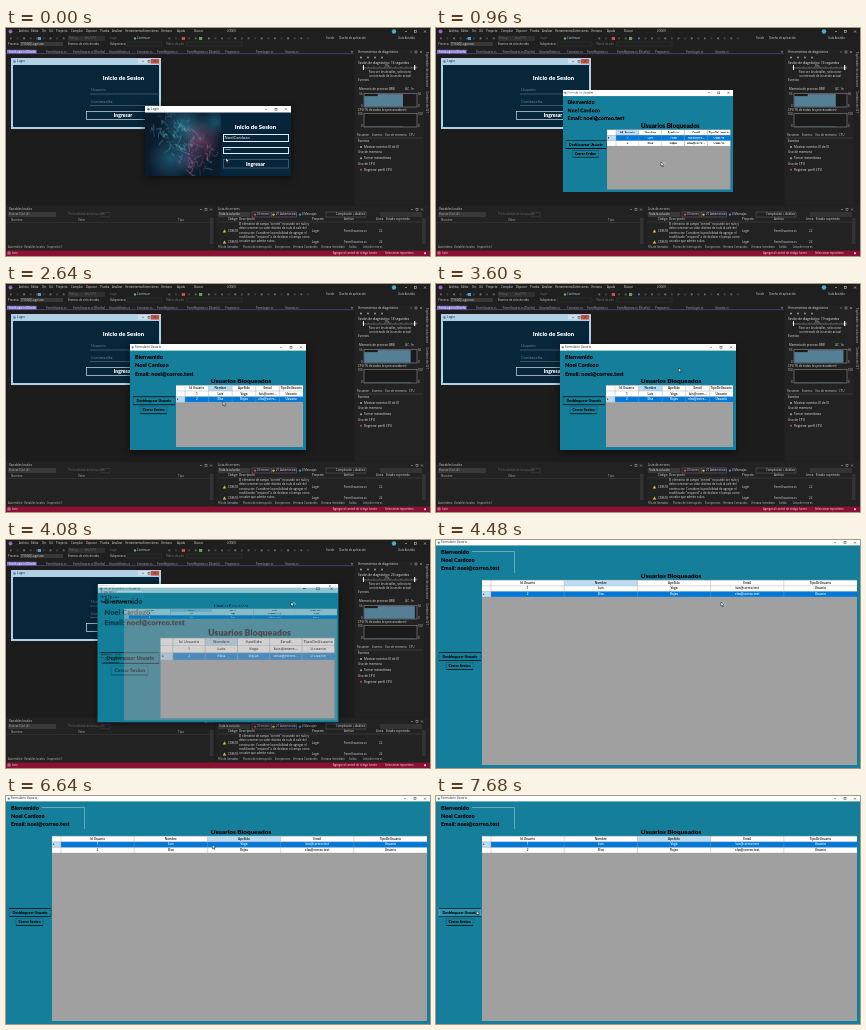
An HTML page with a canvas for the animation above (8000 ms loop, 424 by 228 pixels).

```html
<!DOCTYPE html>
<html lang="es">
<head>
<meta charset="utf-8">
<title>Usuarios bloqueados</title>
<style>
  html, body { margin: 0; width: 100%; height: 100%; overflow: hidden; background: #1f1f1f; }
  canvas { display: block; width: 424px; height: 228px; }
</style>
</head>
<body>
<canvas id="stage" width="424" height="228"></canvas>
<script>
const W = 424, H = 228, LOOP = 8000;
const stage = document.getElementById('stage').getContext('2d');
let g = stage;

const clamp = v => Math.max(0, Math.min(1, v));
const easeOut = u => 1 - (1 - clamp(u)) ** 2;
const smooth = u => u * u * (3 - 2 * u);

// ---- drawing helpers ----
function box(x, y, w, h, color) {
  g.fillStyle = color;
  g.fillRect(x, y, w, h);
}
function shadowBox(x, y, w, h, color) {
  g.save();
  g.shadowColor = 'rgba(0,0,0,.6)';
  g.shadowBlur = 7;
  g.shadowOffsetY = 2;
  box(x, y, w, h, color);
  g.restore();
}
function frame(x, y, w, h, color, width = 0.7) {
  g.strokeStyle = color;
  g.lineWidth = width;
  g.strokeRect(x, y, w, h);
}
function line(color, width, ...points) {
  g.strokeStyle = color;
  g.lineWidth = width;
  g.beginPath();
  points.forEach(([x, y]) => g.lineTo(x, y));
  g.stroke();
}
function dot(x, y, r, color) {
  g.fillStyle = color;
  g.beginPath();
  g.arc(x, y, r, 0, 7);
  g.fill();
}
function text(s, x, y, size, color, align = 'left', font = '"Open Sans", sans-serif', weight = 400) {
  g.font = `${weight} ${size}px ${font}`;
  g.textAlign = align;
  g.textBaseline = 'middle';
  g.fillStyle = color;
  g.fillText(s, x, y);
}
const heavy = (s, x, y, size, color, align) => text(s, x, y, size, color, align, 'Lato, sans-serif', 900);
// Labels written as "x words|x words|..."
function labels(y, spec, color = '#c4c4c4', size = 3) {
  for (const item of spec.split('|')) {
    const [, x, s] = item.match(/^(\d+) (.*)$/);
    text(s, +x, y, size, color);
  }
}
function windowButtons(right, y, color, gap = 10) {
  line(color, 0.5, [right - 2 * gap - 1, y], [right - 2 * gap + 1, y]);
  frame(right - gap - 1, y - 1, 2, 2, color, 0.5);
  line(color, 0.5, [right - 1, y - 1], [right + 1, y + 1]);
  line(color, 0.5, [right - 1, y + 1], [right + 1, y - 1]);
}
function layer(w, h, draw) {
  const canvas = document.createElement('canvas');
  canvas.width = w;
  canvas.height = h;
  g = canvas.getContext('2d');
  draw();
  g = stage;
  return canvas;
}

// ---- development environment ----
function designedForm() {
  box(5, 30, 150, 71, '#b1d0e6');
  text('Login', 11, 33.5, 3.2, '#222');
  dot(8.5, 33.5, 1.2, '#4c7fa6');
  box(132, 31, 12, 4.5, '#cadfeb');
  box(145, 31, 8, 4.5, '#c9503f');
  windowButtons(149, 33.3, '#333', 6);
  box(7, 37, 146, 62, '#07263a');
  heavy('Inicio de Sesion', 117.5, 50, 5.9, '#fff', 'center');
  text('Usuario', 85, 62, 4, '#7b8a94');
  line('#53687a', 0.7, [84, 66], [152, 66]);
  text('Contraseña', 85, 74, 4, '#7b8a94');
  line('#53687a', 0.7, [84, 77.5], [152, 77.5]);
  frame(80.5, 83.5, 72, 8, '#d5dde2', 0.7);
  heavy('Ingresar', 117, 87.5, 5, '#fff', 'center');
}

function diagnostics() {
  box(349, 21, 69, 156, '#222223');
  labels(24, '352 Herramientas de diagnóstico', '#ddd');
  windowButtons(415, 24, '#aaa', 5);
  for (let i = 0; i < 4; i++) dot(355 + i * 7, 29.5, 0.9, i ? '#8aa0b0' : '#aaa');
  line('#999', 0.5, [357, 40], [411, 40]);
  for (let x = 357; x <= 411; x += 5.4) line('#999', 0.4, [x, 38.5], [x, 40]);
  box(357, 37, 1, 5, '#fff');
  box(408, 37, 1.3, 5, '#fff');
  text('10s', 381, 38, 2.8, '#ddd', 'center');
  text('Para ver los detalles, seleccione', 384, 44.5, 2.9, '#ddd', 'center');
  text('un intervalo de la sesión actual', 384, 48, 2.9, '#ddd', 'center');
  labels(52, '352 Eventos', '#e0e0e0');
  labels(61.5, '353 Memoria de proceso (MB)|399 GC|405 In', '#e4e4e4');
  labels(82.5, '352 CPU (% de todos los procesadores)', '#e4e4e4');
  for (const y of [65.5, 85.5]) {
    box(358, y, 53, 13.5, '#1b1b1c');
    frame(358, y, 53, 13.5, '#8d8d8d', 0.6);
    const top = y < 70 ? '66' : '100';
    for (const [x, align] of [[356.5, 'right'], [412, 'left']]) {
      text(top, x, y + 1, 2.8, '#ccc', align);
      text('0', x, y + 13, 2.8, '#ccc', align);
    }
  }
  labels(107.5, '351 Resumen|366 Eventos|379 Uso de memoria|403 CPU', '#ccc', 2.8);
  line('#555', 0.5, [350, 110], [417, 110]);
  ['Eventos', 'Mostrar eventos (0 de 0)', 'Uso de memoria', 'Tomar instantánea', 'Uso de CPU', 'Registrar perfil CPU']
    .forEach((s, i) => {
      const y = 113.2 + i * 5.7, title = i % 2 === 0;
      if (!title) dot(355, y, 1, i === 5 ? '#c84b4b' : '#9ab');
      text(s, title ? 352 : 358, y, 3.1, '#e4e4e4');
    });
}

function bottomPanels() {
  box(0, 178, 208, 44, '#222223');
  box(210, 178, 214, 44, '#222223');
  labels(181.5, '3 Variables locales|212 Lista de errores', '#ccc');
  windowButtons(205, 181.5, '#aaa', 5);
  windowButtons(416, 181.5, '#aaa', 5);
  box(2, 184, 48, 5, '#383838');
  labels(186.6, '3 Buscar (Ctrl+E)', '#aaa');
  labels(186.6, '62 Profundidad de búsqueda:', '#666');
  frame(95, 184.3, 9, 4.5, '#444', 0.5);
  labels(192, '5 Nombre|72 Valor|172 Tipo', '#aaa');
  line('#3c3c3c', 0.5, [0, 194.5], [208, 194.5]);
  box(204, 190, 3.5, 26, '#333334');
  box(212, 184, 32, 5, '#383838');
  labels(186.6, '213 Toda la solución|251 0 Errores|270 27 Advertencias|296 0 Mensajes|330 Compilación + Análisis|377 Buscar en la lista', '#ddd', 2.8);
  dot(249, 186.6, 1.2, '#d04545');
  dot(267.5, 186.6, 1.2, '#d9b13c');
  dot(294, 186.6, 1.2, '#3c8ad9');
  frame(246, 184, 18, 5, '#77628f', 0.5);
  frame(265.5, 184, 25, 5, '#77628f', 0.5);
  frame(320, 184, 40, 5, '#666', 0.5);
  box(374, 184, 42, 5, '#333');
  labels(191.7, '222 Código|233 Descripción|306 Proyecto|338 Archivo|370 Línea|380 Estado suprimido', '#ddd', 2.9);
  line('#444', 0.5, [211, 194], [420, 194]);
  ['El elemento de campo "control" no puede ser nulo y', 'debe contener un valor distinto de nulo al salir del',
    'constructor. Considere la posibilidad de agregar el', 'modificador "required" o de declarar el campo como', 'un valor que admite nulos.']
    .forEach((s, i) => text(s, 233, 196.6 + i * 4.1, 2.9, '#ddd'));
  for (const y of [203, 214]) {
    g.fillStyle = '#e0b93c';
    g.beginPath();
    g.moveTo(218.5, y - 1.5); g.lineTo(220.3, y + 1.5); g.lineTo(216.7, y + 1.5);
    g.fill();
    labels(y, '222 CS8618|306 Login|338 FormUsuarios.cs|373 22', '#ddd', 2.9);
  }
  box(416, 190, 3.5, 26, '#333334');
  labels(219, '2 Automático|18 Variables locales|41 Inspección 1|212 Pila de llamadas|237 Puntos de interrupción|269 Excepciones|287 Ventana Comandos|315 Ventana Inmediato|343 Salida|357 Lista de errores', '#bbb', 2.7);
}

const ide = layer(W, H, () => {
  box(0, 0, W, H, '#1f1f1f');
  dot(4.5, 3.5, 2, '#9a63c7');
  labels(3.5, '13 Archivo|25 Editar|36 Ver|43 Git|50 Proyecto|65 Compilar|80 Depurar|94 Prueba|106 Analizar|119 Herramientas|137 Extensiones|155 Ventana|171 Ayuda|188 Buscar|221 LOGIN', '#dcdcdc', 2.8);
  dot(388, 3.5, 2.2, '#4fa9c8');
  windowButtons(419, 3.5, '#ddd', 9.5);
  for (let i = 0; i < 46; i++) {
    const x = 4 + i * 6.6;
    if (x < 58 || x > 160) box(x, 9.5, 1.8, 1.8, ['#686868', '#4c4c4c', '#587f9f', '#404040'][i * 7 % 4]);
  }
  box(32, 9, 3, 3, '#4c9bd6');
  box(62, 8, 37, 5, '#303030');
  labels(10.5, '63 Debug|79 Any CPU|104 Login', '#6c6c6c', 2.8);
  labels(10.5, '131 Continuar|320 Fondo|333 Diseño de aplicación|392 Guía Asistida', '#cfcfcf', 2.8);
  dot(129, 10.5, 1.2, '#5bb65b');
  box(176, 9, 3, 3, '#c9504a');
  box(193, 9, 3, 3, '#58a75d');
  box(14, 14, 43, 4, '#383838');
  labels(16, '2 Proceso:|15 [15604] Login.exe|62 Eventos de ciclo de vida|104 Subproceso:', '#d6d6d6', 2.8);
  labels(16, '160 Marco de pila:', '#777', 2.8);
  frame(121, 14, 35, 4, '#383838', 0.5);
  frame(181, 14, 55, 4, '#383838', 0.5);
  box(1, 21.8, 29, 3.8, '#8478d0');
  labels(23.8, '3 FormLogin.cs [Diseño]', '#fff', 2.7);
  labels(23.8, '40 FormUsuario.cs|67 FormUsuario.cs [Diseño]|103 UsuarioDatos.cs|131 Conexion.cs|151 FormRegistro.cs|181 FormRegistro.cs [Diseño]|219 Program.cs|250 FormLogin.cs|279 Usuario.cs', '#a8a8a8', 2.8);
  box(0, 25.5, 348, 0.8, '#5d55a0');
  dot(346, 23.8, 0.8, '#aaa');
  box(0, 26.3, 348, 151, '#1c1c1c');
  designedForm();
  diagnostics();
  g.save();
  g.translate(421, 24);
  g.rotate(Math.PI / 2);
  text('Explorador de soluciones     Cambios de GIT', 0, 0, 3, '#bbb');
  g.restore();
  bottomPanels();
  box(0, 222.5, W, 5.5, '#8c1035');
  frame(2, 224, 2, 2, '#ddd', 0.5);
  labels(225.4, '6 Listo|327 Agregar al control de código fuente|379 Seleccionar repositorio', '#f0dce2', 2.7);
  dot(419, 225.3, 1, '#eee');
});

function liveDiagnostics(t) {
  const edge = 397 + t * 0.0029;
  text(`Sesión de diagnóstico: ${16 + Math.floor(t / 1000)} segundos`, 352, 34.8, 3.1, '#f0f0f0');
  box(358.3, 68.5, 14, 10.2, '#557f94');
  box(372, 66.5, edge - 372, 12.2, '#557f94');
  line('#83a9ba', 0.4, [358.3, 68.5], [372, 68.5], [372, 66.5], [edge, 66.5]);
  line('#4f7f94', 0.4, [358.3, 98.6], [375, 98.3], [edge, 98.6]);
}

// ---- login dialog ----
const nebula = layer(76, 64, () => {
  let seed = 11;
  const random = () => (seed = seed * 16807 % 2147483647) / 2147483647;
  box(0, 0, 76, 64, '#0c1b2b');
  g.globalCompositeOperation = 'screen';
  for (const [x, y, r, color] of [[40, 14, 24, '36,112,138'], [26, 46, 24, '24,88,112'], [56, 28, 20, '122,44,72'], [44, 46, 16, '62,40,76'], [70, 10, 16, '20,84,108']]) {
    const glow = g.createRadialGradient(x, y, 0, x, y, r);
    glow.addColorStop(0, `rgba(${color},.7)`);
    glow.addColorStop(1, `rgba(${color},0)`);
    box(0, 0, 76, 64, glow);
  }
  // Filaments flow down to the right, pink on the right-hand side
  for (let i = 0; i < 110; i++) {
    const u = random(), across = random() - 0.5;
    const x = 14 + u * 48 + across * 20, y = 2 + u * 54 - across * 28;
    const pink = x > 42 && y > 12 && random() < 0.65;
    const bend = () => (random() - 0.4) * 13;
    g.strokeStyle = `hsla(${pink ? 342 : 192},55%,${30 + random() * 35}%,.4)`;
    g.lineWidth = 0.4 + random() * 0.7;
    g.beginPath();
    g.moveTo(x, y);
    g.quadraticCurveTo(x + bend(), y + bend(), x + bend(), y + bend());
    g.stroke();
  }
});

function login(t) {
  shadowBox(139, 78, 146, 70, '#07253a');
  box(139, 78, 146, 6.5, '#fff');
  dot(142.5, 81.3, 1.2, '#4c7fa6');
  text('Login', 145, 81.4, 3.2, '#222');
  windowButtons(280, 81.3, '#333');
  g.drawImage(nebula, 139, 84.5, 76, 63.5);
  heavy('Inicio de Sesion', 249.5, 99.5, 5.9, '#fff', 'center');
  frame(217.5, 106.5, 65, 7, '#fff', 0.9);
  text('NoelCardozo', 218.5, 110, 4.2, '#fff');
  frame(217.5, 119.5, 65, 6, '#fff', 0.9);
  text('••••••', 218.5, 122.5, 3, '#fff');
  if (t > 200) box(217, 131.5, 66, 8.5, t > 480 && t < 600 ? '#1b4a66' : '#12384f');
  frame(217.5, 131.5, 65, 8.5, '#6f8593', 0.5);
  heavy('Ingresar', 249.5, 136, 5.2, '#fff', 'center');
}

// ---- user window ----
const HEADERS = ['Id Usuario', 'Nombre', 'Apellido', 'Email', 'TipoDeUsuario'];
const USERS = [
  ['1', 'Luis', 'Vega', 'luis@correo.test', 'Usuario'],
  ['2', 'Elsa', 'Rojas', 'elsa@correo.test', 'Usuario'],
];

function userWindow(w, h, { row, col, hover }) {
  const maximized = w === W, caption = maximized ? 5.4 : 6.6;
  box(0, 0, w, h, '#157f9b');
  box(0, 0, w, caption, '#fff');
  dot(2.7, caption / 2, 1.1, '#4c7fa6');
  text('Formulario Usuario', 5, caption / 2, 2.9, '#222');
  windowButtons(w - 5, caption / 2, '#333');
  if (maximized) line('#9cc8d4', 0.6, [36, 11.5], [78.5, 11.5], [78.5, 33]);
  const y0 = caption - 5.4;
  heavy('Bienvenido', 5, y0 + 12.2, 5.5, '#000');
  heavy('Noel Cardozo', 5, y0 + 20.5, 5.5, '#000');
  heavy('Email: noel@correo.test', 5, y0 + 28.7, 5.5, '#000');
  heavy('Usuarios Bloqueados', w / 2 + 23, y0 + 36.2, 6.4, '#000', 'center');

  const mid = h / 2 + 2.5 + y0;
  if (hover) box(3, mid - 4, 42, 8, '#2b93ae');
  frame(3, mid - 4, 42, 8, hover ? '#7fc0d2' : '#0d586d', 0.5);
  for (const y of [mid - 4, mid + 4]) line('#000', 0.7, [3, y], [45, y]);
  heavy('Desbloquear Usuario', 24, mid, 3.7, '#000', 'center');
  frame(10, mid + 6, 27, 7, '#0d586d', 0.5);
  line('#000', 0.7, [10, mid + 13], [37, mid + 13]);
  heavy('Cerrar Sesion', 23.5, mid + 9.5, 3.7, '#000', 'center');

  const left = 46, top = y0 + 40.2, rowH = 5.6, first = 55, colW = (w - 3 - first) / 5;
  box(left, top, w - 3 - left, h - 3 - top, '#a0a0a0');
  box(left, top, w - 3 - left, rowH * 3, '#fff');
  box(first + col * colW, top, colW, rowH, '#bcdcf4');
  box(left, top + rowH * (row + 1), first - left, rowH, '#bcdcf4');
  box(first, top + rowH * (row + 1), w - 3 - first, rowH, '#0078d7');
  text('▸', left + 1, top + rowH * (row + 1.5), 3, '#222', 'left', '"DejaVu Sans", sans-serif');
  [HEADERS, ...USERS].forEach((cells, r) => cells.forEach((cell, c) => {
    const s = colW < 30 && cell.length > 13 ? cell.slice(0, 10) + '...' : cell;
    text(s, first + (c + 0.5) * colW, top + rowH * (r + 0.5), 3, r === row + 1 ? '#fff' : '#111', 'center', '"Open Sans", sans-serif', 600);
  }));
  for (let i = 0; i < 4; i++) line('#a0a0a0', 0.4, [left, top + i * rowH], [w - 3, top + i * rowH]);
  for (let i = 0; i < 5; i++) line('#a0a0a0', 0.4, [first + i * colW, top], [first + i * colW, top + 3 * rowH]);
}

function userWindowIn(x, y, w, h, baseW, baseH, state, alpha) {
  g.save();
  g.globalAlpha = alpha;
  g.drawImage(layer(baseW * 2, baseH * 2, () => {
    g.scale(2, 2);
    userWindow(baseW, baseH, state);
  }), x, y, w, h);
  g.restore();
}

// ---- timeline ----
const SELECTION = [[0, 0, 0], [2160, 1, 1], [5040, 0, 2], [5360, 1, 2], [5680, 0, 2], [6080, 1, 2], [6480, 0, 2]];
const POINTER = [
  [0, 220, 130], [320, 225, 134], [1840, 225, 134], [2160, 217, 117], [2640, 217, 117.5],
  [2960, 140, 116], [3160, 140, 118], [3400, 182, 115], [3760, 285, 62], [4500, 285, 62],
  [4720, 205, 46], [5000, 206, 47], [5360, 207, 53], [5680, 207, 48], [5900, 208, 54],
  [6300, 208, 53], [6480, 207, 48], [6760, 206, 49], [7440, 40, 115], [8000, 41, 114.5],
];

function pointer(t) {
  const i = Math.max(1, POINTER.findIndex(p => p[0] > t));
  const [t0, x0, y0] = POINTER[i - 1], [t1, x1, y1] = POINTER[i];
  const u = smooth((t - t0) / (t1 - t0));
  const x = x0 + (x1 - x0) * u, y = y0 + (y1 - y0) * u;
  g.beginPath();
  [[0, 0], [0, 4.2], [1, 3.3], [1.7, 4.9], [2.3, 4.6], [1.7, 3.1], [3, 3]].forEach(([a, b]) => g.lineTo(x + a, y + b));
  g.closePath();
  g.fillStyle = '#fff';
  g.strokeStyle = '#111';
  g.lineWidth = 0.5;
  g.fill();
  g.stroke();
  if ((t > 640 && t < 1400) || (t > 3960 && t < 4520)) {
    g.strokeStyle = '#8fd4f0';
    g.lineWidth = 0.7;
    g.beginPath();
    g.arc(x + 3, y + 2, 1.3, t / 120, t / 120 + 5);
    g.stroke();
  }
}

function draw() {
  const t = performance.now() % LOOP;
  const [, row, col] = SELECTION.filter(s => s[0] <= t).pop();
  const state = { row, col, hover: t > 7360 || (t > 2900 && t < 3260) };
  const opened = easeOut((t - 840) / 270), grow = easeOut((t - 4050) / 220);

  if (grow < 1) {
    g.drawImage(ide, 0, 0);
    liveDiagnostics(t);
    if (t < 860) login(t);
    if (t >= 840) {
      const scale = 0.9 + 0.1 * opened;
      const w = (176 + 248 * grow) * scale, h = (106 + 122 * grow) * scale;
      const x = 212 - w / 2, y = 113 + grow - h / 2;
      if (opened === 1) shadowBox(x, y, w, h, '#157f9b');
      if (opened === 1 && grow === 0) {
        g.save();
        g.translate(x, y);
        userWindow(176, 106, state);
        g.restore();
      } else {
        userWindowIn(x, y, w, h, 176, 106, state, clamp((t - 840) / 100));
        userWindowIn(x, y, w, h, W, H, state, clamp(grow * 1.8));
      }
    }
  } else {
    userWindow(W, H, state);
  }
  pointer(t);
  requestAnimationFrame(draw);
}
draw();
</script>
</body>
</html>
```
